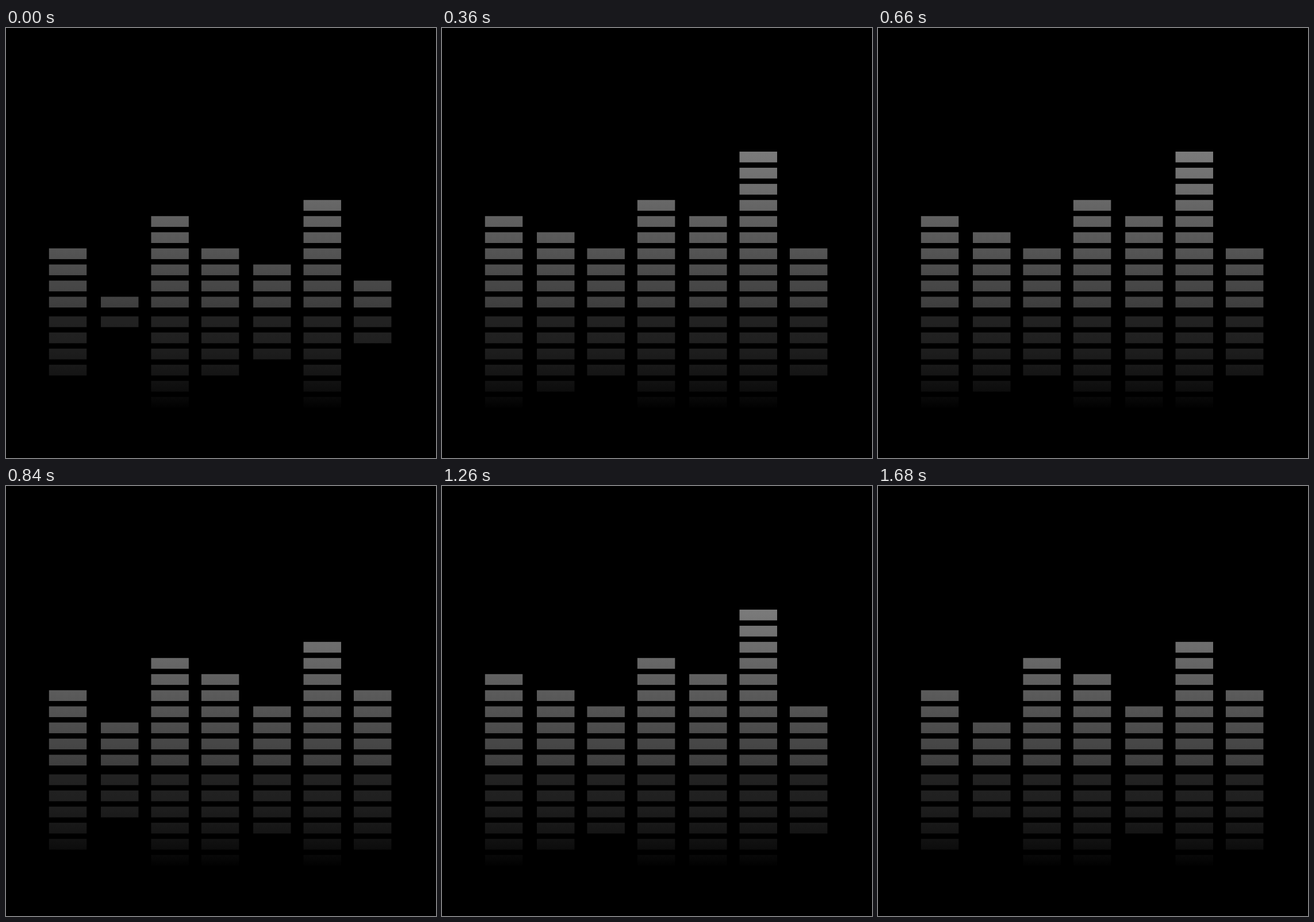
Animation, 748 px wide and 748 px high, one loop 1.74 s. Source, as an HTML page with a canvas:

```html
<!DOCTYPE html>
<html lang="en">
<head>
<meta charset="utf-8">
<title>Equalizer</title>
<style>
  html, body { margin: 0; width: 100%; height: 100%; overflow: hidden; background: #000; }
  canvas { display: block; width: 748px; height: 748px; }
</style>
</head>
<body>
<canvas id="stage" width="748" height="748"></canvas>
<script>
const ctx = document.getElementById('stage').getContext('2d');

// Drawn on an 800 unit grid
const GRID = 800;
ctx.scale(748 / GRID, 748 / GRID);

const STEP = 60, STEPS = 29;
const BLOCK_W = 70, BLOCK_H = 20, PITCH = 30;
const BASE = 500, MIRROR = 536.5;

// Key heights of the seven columns, in blocks
const low = [4, 1, 6, 4, 3, 7, 2];
const peak = [6, 5, 4, 7, 6, 10, 4];
const wide = [9, 6, 8, 5, 8, 7, 3];
const settle = [5, 3, 7, 6, 4, 8, 5];
const between = wide.map((h, i) => Math.floor((h + settle[i]) / 2));
const cycle = [low, peak, wide, between, settle];

// Columns stand in groups, with slightly wider gaps between the groups
const columnX = i => 80 + 93.5 * i + 3 * Math.ceil(i / 3);

function verticalGradient(top, bottom, shade) {
  const gradient = ctx.createLinearGradient(0, top, 0, bottom);
  for (let t = 0; t <= 1; t += 1 / 16) {
    const v = Math.round(shade(t));
    gradient.addColorStop(t, `rgb(${v},${v},${v})`);
  }
  return gradient;
}

const barFill = verticalGradient(230, 520, t => 123 - 61 * t);
const mirrorFill = verticalGradient(MIRROR, 710, t => 34 * (1 - t * t));

function drawStack(x, y, pitch, count, fill) {
  ctx.fillStyle = fill;
  for (let i = 0; i < count; i++) ctx.fillRect(x, y + i * pitch, BLOCK_W, BLOCK_H);
}

function draw(step) {
  // The last cycle is one step short
  const phase = step < STEPS - 2 ? step : step + 1;
  ctx.fillStyle = '#000';
  ctx.fillRect(0, 0, GRID, GRID);
  cycle[phase % cycle.length].forEach((height, i) => {
    drawStack(columnX(i), BASE, -PITCH, height, barFill);
    drawStack(columnX(i), MIRROR, PITCH, height, mirrorFill);
  });
}

const start = performance.now();
function tick() {
  const elapsed = Math.max(0, performance.now() - start);
  draw(Math.floor(elapsed / STEP) % STEPS);
  requestAnimationFrame(tick);
}
tick();
</script>
</body>
</html>
```
